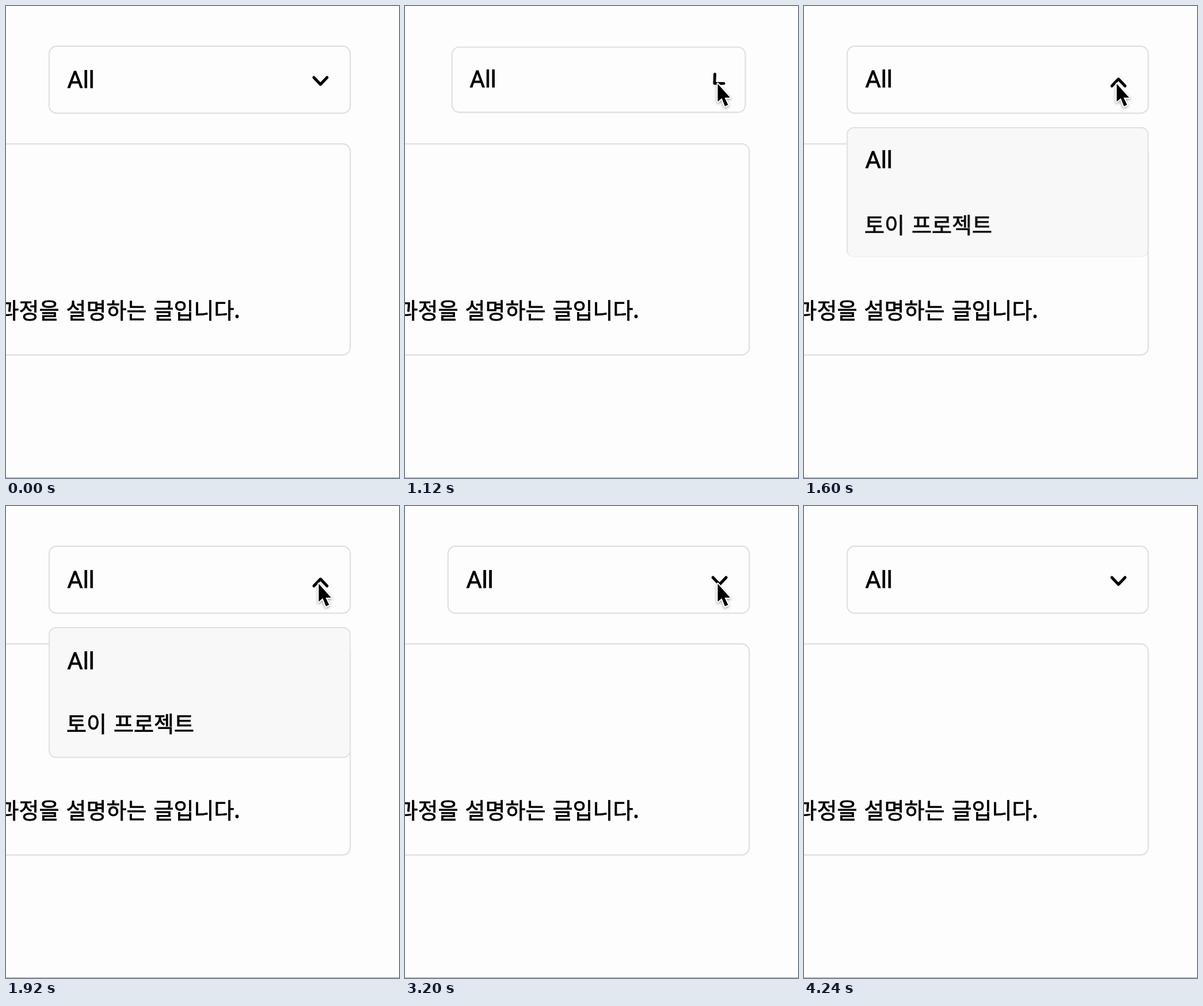
An HTML page for the animation above (4.48 s loop, 683 px wide and 819 px high).

```html
<!DOCTYPE html>
<html lang="ko">
<head>
<meta charset="utf-8">
<style>
  html, body { margin: 0; height: 100%; overflow: hidden; background: #fdfdfd; }
  svg { display: block; width: 683px; height: 819px; }
  text { stroke: #000; stroke-width: .8; }
  .box { fill: none; stroke: #e2e2e6; stroke-width: 2.4; }
  .latin { font: 41.5px Roboto, sans-serif; }
  .korean { font: 38px "Noto Sans CJK KR", "Noto Sans CJK", sans-serif; word-spacing: 1.5px; }
  #cursor path {
    stroke: #fff; stroke-width: 4; stroke-linejoin: round; paint-order: stroke;
    filter: drop-shadow(0 2px 2px rgba(0, 0, 0, .35));
  }
</style>
</head>
<body>
<svg viewBox="0 0 683 819">
  <clipPath id="clip"><rect id="reveal" x="73.8" y="209.8" width="525.4" rx="13"/></clipPath>

  <rect class="box" x="-60" y="239.2" width="658.2" height="366.3" rx="13"/>
  <text class="korean" x="-12.5" y="541.7">과정을 설명하는 글입니다.</text>
  <rect y="818" width="683" height="1" fill="#a0a0a0"/>

  <g id="menu" clip-path="url(#clip)">
    <rect class="box" x="75" y="211" width="523.2" height="225.3" rx="12" style="fill:#f8f8f8"/>
    <g class="item"><text class="latin" x="106.6" y="283">All</text></g>
    <g class="item"><text class="korean" x="105" y="391.7">토이 프로젝트</text></g>
  </g>

  <g id="button">
    <rect class="box" x="75" y="69.8" width="523.2" height="116.2" rx="13"/>
    <text class="latin" x="106.6" y="141.5">All</text>
    <path id="arrow" d="M535 124L546.5 136L558 124" fill="none" stroke="#000"
      stroke-width="5" stroke-linecap="round" stroke-linejoin="round"/>
  </g>

  <g id="cursor"><path d="M.5 1V32L7.5 26L13 40L18.5 37.5L12.5 25H22Z"/></g>
</svg>
<script>
const LOOP = 4480, STEP = 80;
const OPEN = { press: 940, click: 1087 }, CLOSE = { press: 2860, click: 2940 };
const $ = id => document.getElementById(id);
const items = document.querySelectorAll('.item');
const clamp = v => Math.min(1, Math.max(0, v));
const easeOut = u => Math.sin(clamp(u) * Math.PI / 2);

// Distance still to go (1 to 0) of an underdamped spring after ms.
function spring(ms, stiffness, damping) {
  if (ms <= 0) return 1;
  const t = ms / 1000, decay = damping / 2, w = Math.sqrt(stiffness - decay * decay);
  return Math.exp(-decay * t) * (Math.cos(w * t) + decay / w * Math.sin(w * t));
}

// The same for a critically damped spring.
function settle(ms, omega) {
  const x = Math.max(0, ms) / 1000 * omega;
  return (1 + x) * Math.exp(-x);
}

const pressed = (t, tap) => spring(t - tap.click, 550, 30) - spring(t - tap.press, 550, 30);

function drawButton(t) {
  const scale = 1 - .03 * (pressed(t, OPEN) + pressed(t, CLOSE));
  $('button').setAttribute('transform',
    `translate(336.6 128) scale(${scale}) translate(-336.6 -128)`);
  const turn = easeOut((t - OPEN.click) / 200) - easeOut((t - CLOSE.click) / 200);
  $('arrow').setAttribute('transform', `rotate(${180 * turn} 546.5 131.4)`);
}

function drawMenu(t) {
  const shown = (1 - settle(t - OPEN.click - 38, 14.25)) * settle(t - CLOSE.click, 30.8);
  $('menu').style.display = shown > .02 ? '' : 'none';
  $('reveal').setAttribute('height', 227.7 * shown);
  const leaving = easeOut((t - CLOSE.click) / 200);
  items.forEach((item, i) => {
    const away = spring(t - OPEN.click - 300 - 50 * i, 300, 24) + leaving;
    item.setAttribute('transform', `translate(0 ${46 * away})`);
    item.setAttribute('opacity', clamp(1 - away));
  });
}

function drawCursor(t) {
  const left = 1 - clamp((t - 80) / 640), exit = clamp((t - 3840) / 320);
  const x = 543 + 140 * left ** 2.6 + 53 * exit ** 1.6;
  const y = 134 + 8 * left + 2 * exit;
  $('cursor').setAttribute('transform', `translate(${x} ${y})`);
  $('cursor').style.display = t >= 80 && t < 4240 ? '' : 'none';
}

function frame() {
  const t = Math.floor(performance.now() % LOOP / STEP) * STEP;
  drawButton(t);
  drawMenu(t);
  drawCursor(t);
  requestAnimationFrame(frame);
}
frame();
</script>
</body>
</html>
```
